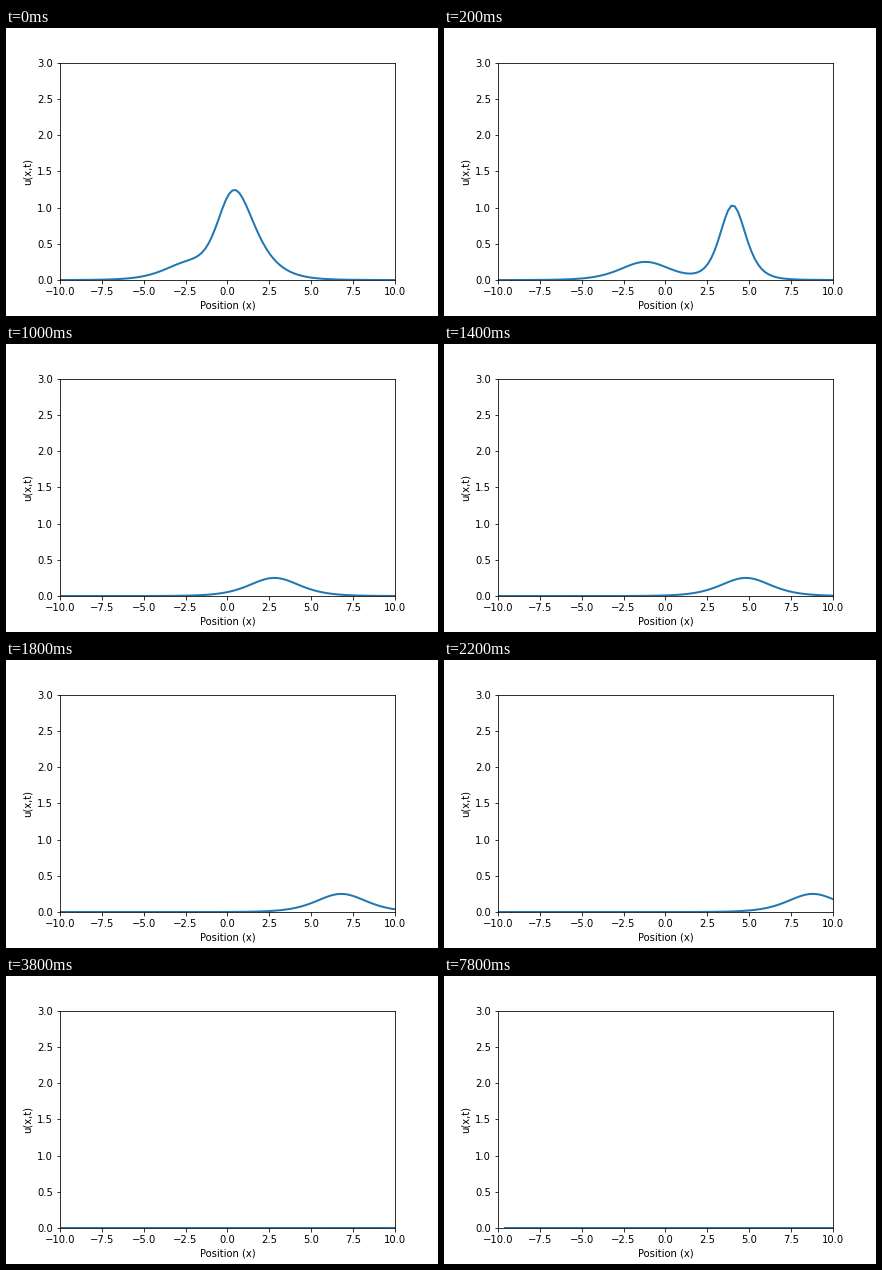
These frames come from a looping animation (432x288 px, 8 s). A matplotlib script:

```python
import numpy as np
import matplotlib.pyplot as plt
from matplotlib.animation import FuncAnimation

FRAMES = 40
INTERVAL = 200  # ms
A1, A2 = 1.0, 2.0  # wave numbers of the slow and the fast soliton
M = ((A2 - A1) / (A2 + A1)) ** 2


def wave(x, t):
    """Two waves parting after they meet at t = 0."""
    # exp overflows late on the far left; the NaNs leave a gap in the line
    with np.errstate(over="ignore", invalid="ignore"):
        f1 = np.exp(-A1 * x + A1**3 * t)
        f2 = np.exp(-A2 * x + A2**3 * t)
        top = ((A1**2 + A2**2) * f1 + A2**2 * f2
               + 2 * (A2 - A1) ** 2 * f1 * f2
               + M * A1**2 * f1 * f2**2)
        return top / (1 + f1 + f2 + M * f1 * f2) ** 2


fig = plt.figure(figsize=(6, 4), dpi=72, facecolor="white")
fig.subplots_adjust(left=0.125, right=0.9, bottom=0.125, top=0.88)
ax = fig.add_subplot(xlim=(-10, 10), ylim=(0, 3))
ax.set_xlabel("Position (x)")
ax.set_ylabel("u(x,t)")

x = np.linspace(-10, 10, 100)
line, = ax.plot(x, wave(x, 0), lw=2)


def update(t):
    line.set_ydata(wave(x, t))
    return line,


anim = FuncAnimation(fig, update, frames=FRAMES, interval=INTERVAL,
                     repeat=True, repeat_delay=0)
plt.show()
```
